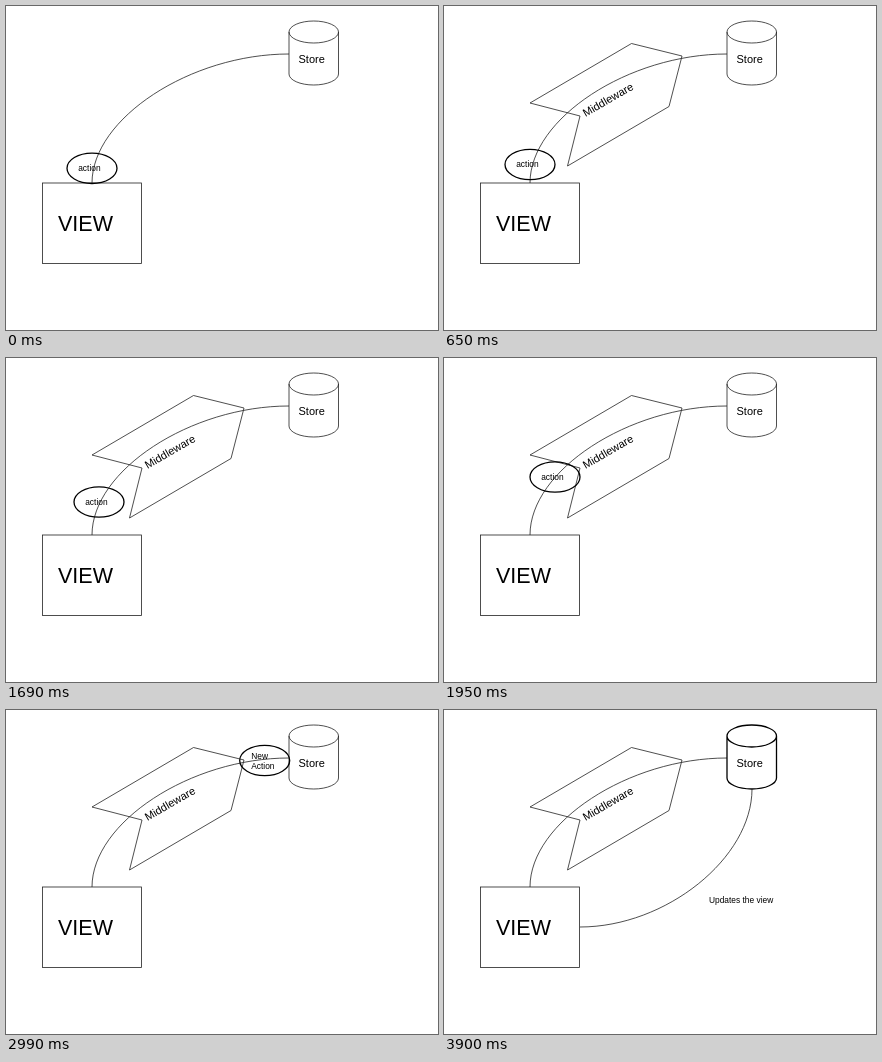
Recreate the animation shown at these times as an HTML page. Size 432 px wide and 324 px high, loop 4550 ms.

```html
<!DOCTYPE html>
<html lang="en">
<head>
<meta charset="utf-8">
<title>Action flow</title>
<style>
  html, body { margin: 0; width: 100%; height: 100%; overflow: hidden; background: #fff; }
  svg { display: block; width: 100vw; height: 100vh; font-family: "Liberation Sans", Arial, sans-serif; }
  .line { fill: none; stroke: #222; stroke-width: .8; }
  .bold { stroke: #000; stroke-width: 1.3; }
  .small { font-size: 8.4px; }
  .label { font-size: 11px; }
  .dim .label, .dim .title { stroke: #000; stroke-width: .25; }
  .dim #store { stroke: #222; stroke-width: 1.4; }
</style>
</head>
<body>
<svg id="stage" viewBox="0 0 432 324">
  <rect id="back" width="432" height="324" fill="#fff"/>
  <g id="middleware">
    <path class="line" d="M86 97L187.500 37.500L238 50L225 100.500L123.500 160L136 110Z"/>
    <text class="label" transform="translate(141.500 111) rotate(-30)">Middleware</text>
  </g>
  <rect class="line" x="36.500" y="177" width="99" height="80.500"/>
  <text class="title" x="52" y="225" font-size="21.500">VIEW</text>
  <path class="line" d="M86 177C86 112.500 184.500 48 283 48"/>
  <path id="store" class="line" d="M283 26V68A24.750 11 0 0 0 332.500 68V26A24.750 11 0 0 0 283 26A24.750 11 0 0 0 332.500 26"/>
  <text class="label" x="292.500" y="56.500">Store</text>
  <g id="action">
    <ellipse class="line bold" rx="25" ry="15.200"/>
    <text id="plain" class="small" x="-13.800" y="2.800">action</text>
    <g id="fresh" class="small">
      <text x="-13.500" y="-2">New</text>
      <text x="-13.500" y="8">Action</text>
    </g>
  </g>
  <g id="update">
    <path class="line" d="M136 217C222 217 308 148 308 79"/>
    <text class="small" x="265" y="193">Updates the view</text>
  </g>
</svg>
<script>
const STEP = 650;
const steps = [
  { at: [86, 162.3] },
  { at: [86, 158.5], mid: true },
  { at: [93, 144], mid: true },
  { at: [111, 119], mid: true },
  { at: [258.7, 50.5], mid: true, fresh: true },
  { mid: true, dim: true },
  { mid: true, update: true }
];
const $ = id => document.getElementById(id);
const show = (id, on) => $(id).setAttribute("visibility", on ? "visible" : "hidden");
let current = -1;

function draw(index) {
  const s = steps[index];
  show("middleware", s.mid);
  show("update", s.update);
  show("action", s.at);
  show("plain", s.at && !s.fresh);
  show("fresh", s.fresh);
  if (s.at) $("action").setAttribute("transform", `translate(${s.at})`);
  $("stage").classList.toggle("dim", !!s.dim);
  $("back").setAttribute("fill", s.dim ? "#e2e2e2" : "#fff");
  $("store").classList.toggle("bold", !!s.update);
}

const start = performance.now();
function tick() {
  const elapsed = Math.max(0, performance.now() - start);
  const index = Math.floor(elapsed / STEP) % steps.length;
  if (index !== current) draw(current = index);
  requestAnimationFrame(tick);
}
tick();
</script>
</body>
</html>
```
